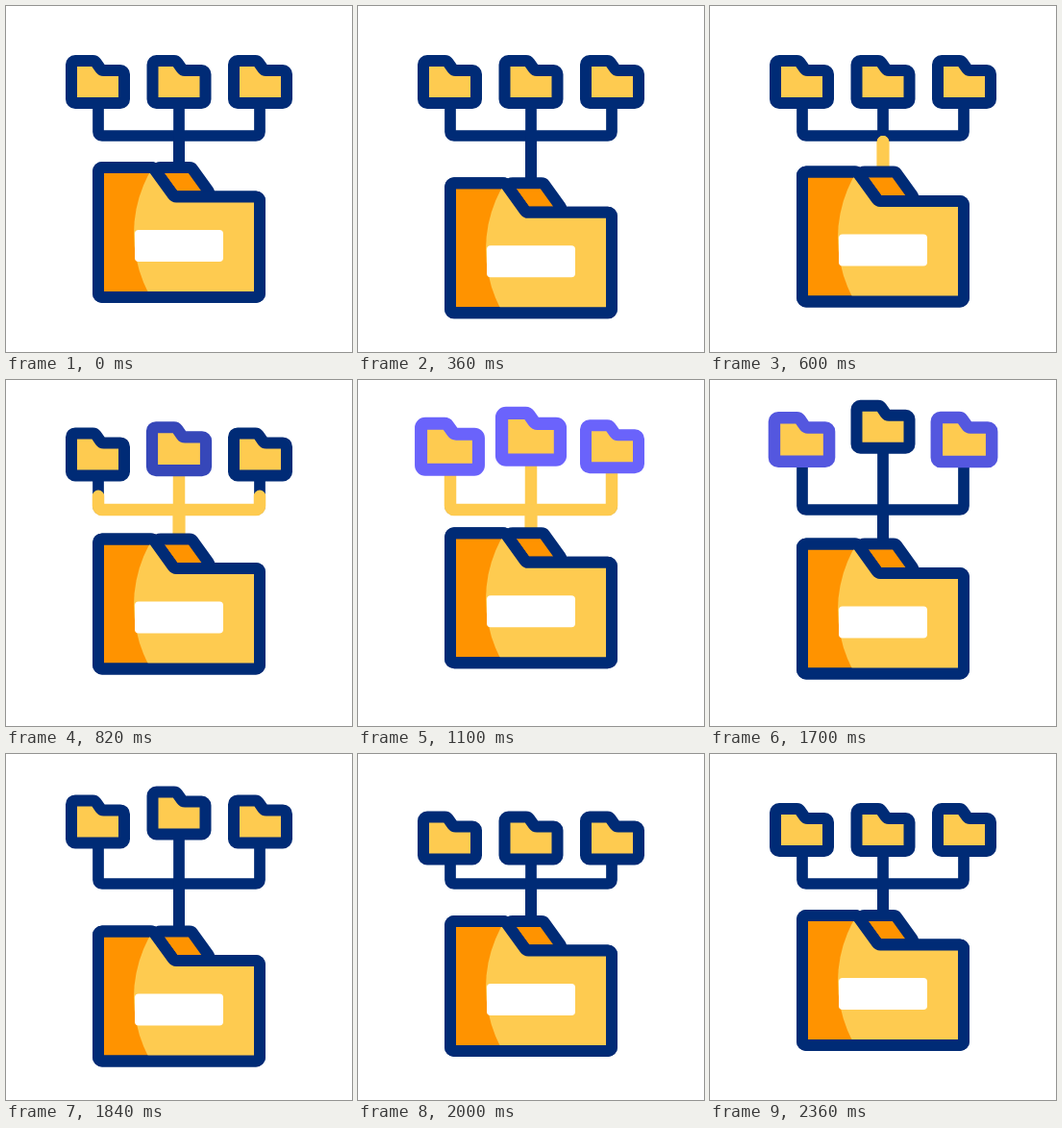
These frames come from a looping animation (360x360 px, 2.74 s). An HTML page with a canvas:

```html
<!DOCTYPE html>
<html lang="en">
<head>
<meta charset="utf-8">
<title>Folder network</title>
<style>
html, body { margin: 0; width: 100%; height: 100%; overflow: hidden; background: #fff; }
canvas { display: block; width: 360px; height: 360px; }
</style>
</head>
<body>
<canvas id="stage"></canvas>
<script>
const LOOP = 2740, STEP = 20;
const NAVY = '#002b76', YELLOW = '#fecb50', ORANGE = '#ff9300';
const SPEED = 0.458; // signal, px per ms

const canvas = document.getElementById('stage');
const ctx = canvas.getContext('2d');
const ratio = window.devicePixelRatio || 1;
canvas.width = canvas.height = 360 * ratio;

// Easing: progress from a to b, clamped.
const linear = (t, a, b) => Math.min(1, Math.max(0, (t - a) / (b - a)));
const ramp = (t, a, b) => { const p = linear(t, a, b); return p * p * (3 - 2 * p); };
const glide = (t, a, b) => Math.sin(linear(t, a, b) * Math.PI / 2);
const pulse = (t, a, b, c, d) => ramp(t, a, b) - ramp(t, c, d);
const hop = (t, a, b, c) => pulse(t, a, b, b, c);

// Push down, recoil, then a second push as the children drop back.
const mainY = t => 16.5 * hop(t, 200, 370, 720)
  - 8.7 * pulse(t, 700, 1030, 1580, 1840)
  + 16.5 * hop(t, 1580, 1840, 2110);

// Rise by lift, fall past the rest place, settle.
const childY = (t, lift, from, to) => -lift * glide(t, from, to)
  + (lift + 8.5) * ramp(t, 1740, 2000) - 8.5 * ramp(t, 2000, 2360);

const sideY = t => childY(t, 17, 770, 1620);
const sideGlow = t => pulse(t, 870, 1110, 1640, 1840);
const lateSwell = t => 0.1 * hop(t, 1200, 1580, 1800);

const children = [
  { x: 95.5, y: sideY, glow: sideGlow,
    size: t => 1 + 0.1 * hop(t, 880, 1160, 1420) + 0.09 * hop(t, 1420, 1580, 1800) },
  { x: 180, y: t => childY(t, 30.3, 680, 1580),
    glow: t => pulse(t, 690, 950, 1430, 1660),
    size: t => 1 + 0.11 * pulse(t, 700, 1150, 1430, 1680) },
  { x: 264.5, y: sideY, glow: sideGlow, size: t => 1 + lateSwell(t) }
];

function glowColor(p) {
  const blend = (a, b) => Math.round(a + (b - a) * p);
  return `rgb(${blend(0, 107)}, ${blend(43, 99)}, ${blend(118, 252)})`;
}

// Polyline with softened corners.
function trace(points, closed) {
  const first = points[0], last = points[points.length - 1];
  ctx.beginPath();
  if (closed) ctx.moveTo((first[0] + last[0]) / 2, (first[1] + last[1]) / 2);
  else ctx.moveTo(...first);
  points.forEach((p, i) => {
    const next = points[i + 1] || (closed && first);
    if (!closed && i === 0) return;
    if (next) ctx.arcTo(...p, ...next, 4);
    else ctx.lineTo(...p);
  });
  if (closed) ctx.closePath();
}

function shape(points, fill, line) {
  trace(points, true);
  ctx.fillStyle = fill;
  ctx.fill();
  ctx.strokeStyle = line;
  ctx.lineWidth = 12;
  ctx.stroke();
}

function routes(t, top) {
  return children.map(c => {
    const foot = 78 + c.y(t) + 28 * c.size(t);
    if (c.x === 180) return [[180, top], [180, foot]];
    const x = 180 + Math.sign(c.x - 180) * 84;
    return [[180, top], [180, 135], [x, 135], [x, foot]];
  });
}

function routeLength(r) {
  return r.slice(1).reduce(
    (sum, p, i) => sum + Math.abs(p[0] - r[i][0]) + Math.abs(p[1] - r[i][1]), 0);
}

function wires(t) {
  ctx.strokeStyle = NAVY;
  ctx.lineWidth = 11.7;
  routes(t, 167 + mainY(t)).forEach(r => { trace(r); ctx.stroke(); });

  const head = (t - 544) * SPEED, tail = Math.max(0, (t - 1228) * SPEED);
  if (head <= 0) return;
  ctx.save();
  ctx.strokeStyle = YELLOW;
  ctx.lineWidth = 12.5;
  ctx.lineCap = 'round';
  ctx.setLineDash([head - tail, 2000]);
  ctx.lineDashOffset = -tail;
  routes(t, 167).filter(r => tail < routeLength(r))
    .forEach(r => { trace(r); ctx.stroke(); });
  ctx.restore();
}

function child(c, t) {
  const size = c.size(t);
  ctx.save();
  ctx.translate(c.x, 79 + c.y(t));
  ctx.scale(size, size);
  shape([[-27.5, -22], [-3, -22], [4, -12], [27.5, -12], [27.5, 22], [-27.5, 22]],
    YELLOW, glowColor(c.glow(t)));
  ctx.restore();
}

function mainFolder(t) {
  const front = [[96, 168], [153, 168], [175, 198.5], [264, 198.5], [264, 303], [96, 303]];
  ctx.save();
  ctx.translate(0, mainY(t));
  shape([[153, 168], [193, 168], [215, 198.5], [175, 198.5]], ORANGE, NAVY);
  shape(front, ORANGE, NAVY);

  ctx.save();
  ctx.clip();
  ctx.beginPath();
  ctx.arc(265, 237, 132, 0, Math.PI * 2);
  ctx.fillStyle = YELLOW;
  ctx.fill();
  ctx.restore();
  trace(front, true);
  ctx.stroke();

  ctx.beginPath();
  ctx.roundRect(134, 233, 92, 33, 4);
  ctx.fillStyle = '#fff';
  ctx.fill();
  ctx.restore();
}

function draw(t) {
  ctx.setTransform(ratio, 0, 0, ratio, 0, 0);
  ctx.fillStyle = '#fff';
  ctx.fillRect(0, 0, 360, 360);
  ctx.lineJoin = 'round';
  wires(t);
  children.forEach(c => child(c, t));
  mainFolder(t);
}

const start = performance.now();
function frame() {
  const t = (performance.now() - start) % LOOP;
  draw(Math.floor(t / STEP) * STEP);
  requestAnimationFrame(frame);
}
frame();
</script>
</body>
</html>
```
